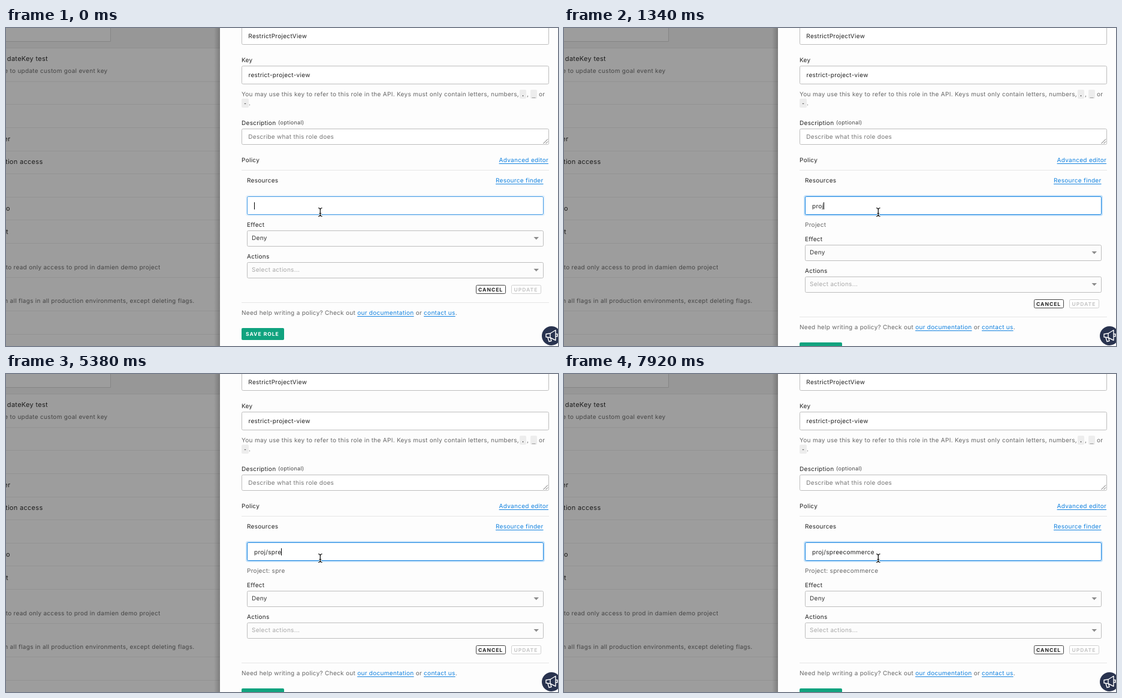
These frames come from a looping animation (921 px wide and 531 px high, 8000 ms). An HTML page with a canvas:

```html
<!DOCTYPE html>
<html lang="en">
<head>
<meta charset="utf-8">
<title>Role policy editor</title>
<style>
  html, body { margin: 0; width: 100%; height: 100%; overflow: hidden; background: #fdfdfd; }
  canvas { display: block; width: 921px; height: 531px; }
</style>
</head>
<body>
<canvas id="stage" width="921" height="531"></canvas>
<script>
const ctx = document.getElementById('stage').getContext('2d');
const LOOP = 8000;
const TYPED = 'proj/spreecommerce';

// [start ms, typed characters, caret visible]
const STEPS = [
  [0, 0, 1], [450, 0, 0], [1050, 1, 1], [1190, 2, 1],
  [1340, 4, 1], [1940, 4, 0], [2390, 4, 1], [2840, 4, 0],
  [2990, 5, 1], [3430, 5, 0], [4030, 5, 1], [4480, 5, 0],
  [4930, 6, 1], [5080, 7, 1], [5380, 9, 1], [5530, 10, 1], [6130, 10, 0],
  [6430, 12, 1], [6730, 13, 1], [6880, 15, 1], [7020, 16, 1],
  [7170, 17, 1], [7320, 18, 1], [7920, 18, 0]
];

const INK = '#222222', MUTED = '#666666', LINK = '#0f80df', BORDER = '#bdbdbd';
const BODY = { font: '10px Inter, sans-serif', spacing: '0.3px' };
const TITLE = { font: '11px Inter, sans-serif', spacing: '0.3px' };
const SMALL = { font: '9px Inter, sans-serif', spacing: '0.3px' };
const BUTTON = { font: '700 8.5px Inter, sans-serif', spacing: '1px' };
const CODE = { font: '10px "DejaVu Sans Mono", monospace', spacing: '0px' };

function setStyle(style) {
  ctx.font = style.font;
  ctx.letterSpacing = style.spacing;
  ctx.textRendering = 'geometricPrecision';
}

// Draws a string and returns the x where it ends.
function text(str, x, y, color = INK, style = BODY) {
  setStyle(style);
  ctx.fillStyle = color;
  ctx.fillText(str, x, y);
  return x + ctx.measureText(str).width;
}

function textEnding(str, right, y, color, style = BODY) {
  setStyle(style);
  text(str, right - ctx.measureText(str).width, y, color, style);
}

function link(str, x, y) {
  const end = text(str, x, y, LINK);
  rect(x, y + 2, end - x, 1, LINK);
  return end;
}

function linkEnding(str, right, y) {
  setStyle(BODY);
  link(str, right - ctx.measureText(str).width, y);
}

function rect(x, y, w, h, color) {
  ctx.fillStyle = color;
  ctx.fillRect(x, y, w, h);
}

function rounded(x, y, w, h, r, fill) {
  ctx.beginPath();
  ctx.roundRect(x, y, w, h, r);
  ctx.fillStyle = fill;
  ctx.fill();
}

function box(x, y, w, h, border = BORDER, fill = '#ffffff', r = 2) {
  rounded(x + 0.5, y + 0.5, w - 1, h - 1, r, fill);
  ctx.strokeStyle = border;
  ctx.lineWidth = 1;
  ctx.stroke();
}

function path(points, close) {
  ctx.beginPath();
  points.forEach(([x, y]) => ctx.lineTo(x, y));
  if (close) ctx.closePath();
}

function drawBackdrop() {
  rect(0, 0, 357, 531, '#9d9d9d');
  rect(0, 0, 357, 33, '#979797');
  rect(0, 33, 357, 1, '#8f8f8f');
  box(-4, -4, 179, 27, '#858585', '#9d9d9d', 0);
  for (const y of [89, 127, 166, 205, 243, 282, 320, 359, 416, 472, 511]) {
    rect(0, y, 357, 1, '#939393');
  }

  const title = '#1d1d1d', note = '#454545';
  textEnding('dateKey test', 70, 55, title, TITLE);
  textEnding('e to update custom goal event key', 169.5, 75, note);
  textEnding('er', 7.5, 189, title, TITLE);
  textEnding('tion access', 61.5, 227, title, TITLE);
  textEnding('o', 7, 305, title, TITLE);
  textEnding('t', 4, 344, title, TITLE);
  textEnding('to read only access to prod in damien demo project', 257.5, 403, note);
  textEnding('n all flags in all production environments, except deleting flags.', 314.5, 459, note);

  const shade = ctx.createLinearGradient(347, 0, 357, 0);
  shade.addColorStop(0, 'rgba(0,0,0,0)');
  shade.addColorStop(1, 'rgba(0,0,0,0.2)');
  rect(347, 0, 10, 531, shade);
}

function drawDetails() {
  rect(357, 0, 564, 531, '#fdfdfd');

  box(393, -4, 513, 32);
  text('RestrictProjectView', 404.3, 17);

  text('Key', 393, 57);
  box(393, 63, 513, 31);
  text('restrict-project-view', 404.5, 82);

  text('You may use this key to refer to this role in the API. Keys must only contain letters, numbers,',
    393, 114, MUTED);
  rounded(857, 103, 11, 15, 2, '#ededed');
  text('.', 859.5, 114, INK, CODE);
  text(',', 869, 114, MUTED);
  rounded(875, 103, 11, 15, 2, '#ededed');
  text('_', 877.5, 114, INK, CODE);
  text('or', 889, 114, MUTED);
  rounded(393, 118, 12, 15, 2, '#ededed');
  text('-', 396, 129, INK, CODE);
  text('.', 405, 129, MUTED);

  text('Description', 393, 162);
  text('(optional)', 454, 161, '#444444', SMALL);
  box(393, 168, 513, 27);
  text('Describe what this role does', 404.3, 185, '#757575');
  ctx.strokeStyle = '#666666';
  ctx.lineWidth = 1;
  path([[896.5, 193], [904, 185.5]]);
  ctx.stroke();
  path([[900.5, 193], [904, 189.5]]);
  ctx.stroke();

  text('Policy', 393, 224);
  linkEnding('Advanced editor', 905, 224);
  rect(393, 237, 513, 1, '#e6e6e6');
  text('Resources', 402, 258);
  linkEnding('Resource finder', 896.5, 258);
}

function drawSelect(label, value, color, y) {
  text(label, 402, y);
  box(402, y + 6, 495, 27, BORDER, '#fcfcfc');
  text(value, 410, y + 22, color);
  path([[880.5, y + 17], [889, y + 17], [884.75, y + 21.5]], true);
  ctx.fillStyle = '#8c8c8c';
  ctx.fill();
}

function drawLowerForm(shift) {
  ctx.save();
  ctx.translate(0, shift);
  drawSelect('Effect', 'Deny', '#333333', 332);
  drawSelect('Actions', 'Select actions...', '#a8a8a8', 385);

  box(784, 429, 50, 15, '#444444');
  text('CANCEL', 788, 440, INK, BUTTON);
  box(843, 429, 50, 15, '#cfcfcf');
  text('UPDATE', 847.5, 440, '#c6c6c6', BUTTON);

  rect(393, 458, 513, 1, '#e6e6e6');
  let x = text('Need help writing a policy? Check out ', 393, 479, MUTED);
  x = link('our documentation', x, 479);
  x = text(' or ', x, 479, MUTED);
  x = link('contact us', x, 479);
  text('.', x, 479, MUTED);

  rounded(393, 501, 71, 20, 2, '#10a37f');
  text('SAVE ROLE', 400, 514, '#ffffff', BUTTON);
  ctx.restore();
}

function drawResource(time, value, caret) {
  const focused = time >= 150;
  rounded(400, 279, 499, 35, 4, focused ? '#c5e2fa' : '#e6f2fc');
  box(402, 281, 495, 31, focused ? '#0f80df' : '#3f98e4');
  const end = text(value, 414, 301);
  if (caret) rect(Math.floor(end), 291, 1, 12, '#000000');

  if (value.length >= 4) {
    const name = value.slice(5);
    text(name ? 'Project: ' + name : 'Project', 402, 332, MUTED);
  }
}

function drawPointer() {
  for (const [color, width] of [['#ffffff', 3], ['#000000', 1.2]]) {
    ctx.strokeStyle = color;
    ctx.lineWidth = width;
    ctx.beginPath();
    ctx.moveTo(521, 300.5);
    ctx.quadraticCurveTo(524, 300.5, 524.3, 303);
    ctx.lineTo(524.3, 312);
    ctx.quadraticCurveTo(524, 314.5, 521, 314.5);
    ctx.moveTo(527.6, 300.5);
    ctx.quadraticCurveTo(524.6, 300.5, 524.3, 303);
    ctx.moveTo(527.6, 314.5);
    ctx.quadraticCurveTo(524.6, 314.5, 524.3, 312);
    ctx.moveTo(522.5, 309.5);
    ctx.lineTo(526.1, 309.5);
    ctx.stroke();
  }
}

function drawMegaphone() {
  ctx.beginPath();
  ctx.arc(910, 514, 16, 0, Math.PI * 2);
  ctx.fillStyle = '#29334f';
  ctx.fill();
  ctx.strokeStyle = '#ffffff';
  ctx.lineWidth = 1.4;
  ctx.lineJoin = 'round';
  path([[901, 511], [908, 510], [917, 504.5], [917, 521.5], [908, 517], [901, 516]], true);
  ctx.stroke();
  path([[904, 517], [906, 523.5], [910, 522.5], [908.5, 517.5]]);
  ctx.stroke();
  path([[908, 510], [908, 517]]);
  ctx.stroke();
  path([[917, 511], [920, 511], [920, 515], [917, 515]]);
  ctx.stroke();
}

function draw(now) {
  const time = now % LOOP;
  const [, count, caret] = STEPS.findLast(([start]) => start <= time);
  drawBackdrop();
  drawDetails();
  drawLowerForm(count >= 4 ? 24 : 0);
  drawResource(time, TYPED.slice(0, count), caret);
  drawPointer();
  drawMegaphone();
}

const startTime = performance.now();
function tick() {
  draw(performance.now() - startTime);
  requestAnimationFrame(tick);
}
tick();
</script>
</body>
</html>
```
